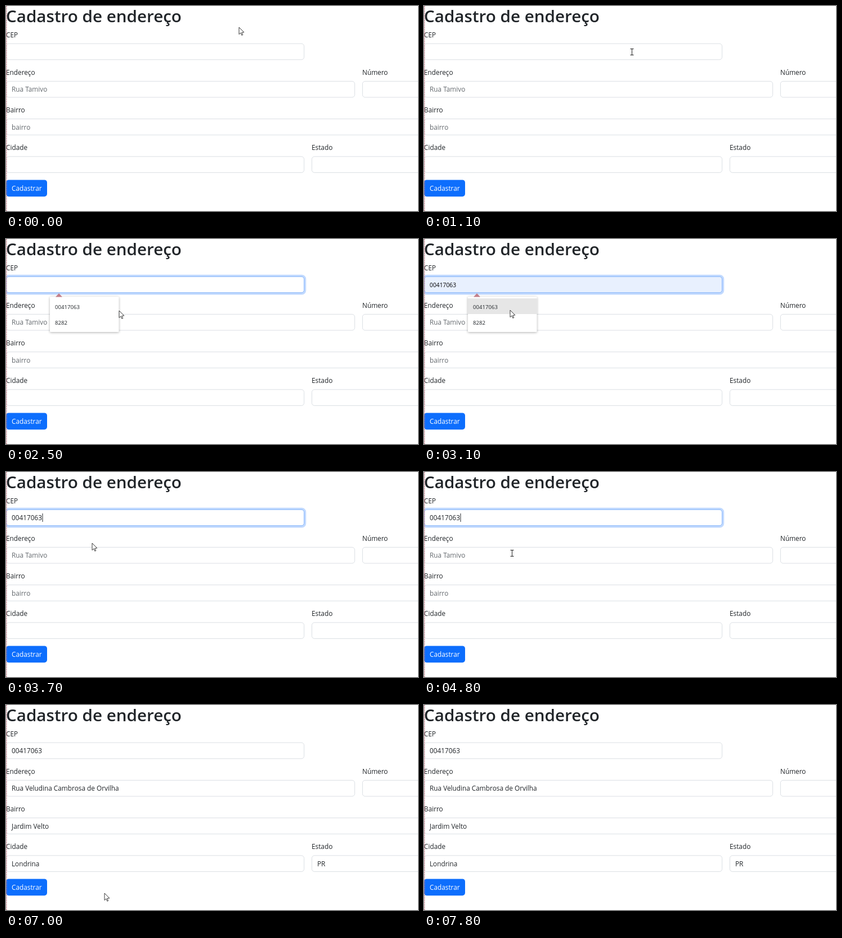
These frames come from a looping animation (732 by 366 pixels, 8 s). An HTML page with a canvas:

```html
<!DOCTYPE html>
<html lang="pt-BR">
<head>
<meta charset="utf-8">
<title>Cadastro de endereço</title>
<style>
html, body { margin: 0; width: 100%; height: 100%; overflow: hidden; background: #fff; }
canvas { display: block; }
</style>
</head>
<body>
<canvas id="stage" width="732" height="366"></canvas>
<script>
const ctx = document.getElementById('stage').getContext('2d');
const FONT = '"Open Sans", "Noto Sans", sans-serif';
const INK = '#212529', HINT = '#64696e', BLUE = '#0d6efd';
const LOOP = 8000, STEP = 100;
const CEP = '00417063';

// Moments of the story, in ms
const CLICK = 1700, HOVER = 2600, PICK = 3600, FILL = 5700;

// Form layout: rows at a fixed pitch, all controls equally high
const TOP = 67, PITCH = 67.2, HEIGHT = 29.4, RADIUS = 4.7, PAD = 10, SIZE = 11.8;
const field = (row, x, right, label, hint = '', value = '') =>
  ({ x, y: TOP + row * PITCH, w: right - x, label, hint, value });
const fields = [
  field(0, 0, 530, 'CEP'),
  field(1, 0, 620, 'Endereço', 'Rua Tamivo', 'Rua Veludina Cambrosa de Orvilha'),
  field(1, 633, 780, 'Número'),
  field(2, 0, 780, 'Bairro', 'bairro', 'Jardim Velto'),
  field(3, 0, 530, 'Cidade', '', 'Londrina'),
  field(3, 543, 780, 'Estado', '', 'PR')
];
const cepField = fields[0];

// Pointer moves; it rests between them
const move = (from, to, x, y) => ({ from, to, x, y });
const moves = [
  move(0, 1100, 369, 82),
  move(1900, 2500, 201, 128),
  move(2500, 3100, 153, 127),
  move(4300, 4800, 156, 145),
  move(4800, 5400, 175, 336),
  move(7200, 7400, 421, 143),
  move(7400, 7600, 474, -11),
  move(7700, 7800, 476, -30)
];

function pointerAt(t) {
  let x = 414, y = 38;
  for (const m of moves) {
    const u = Math.min(1, Math.max(0, (t - m.from) / (m.to - m.from)));
    const k = u * u * (3 - 2 * u);
    x += (m.x - x) * k;
    y += (m.y - y) * k;
  }
  return [x, y];
}

function text(str, x, y, size = SIZE, color = INK, weight = 400) {
  ctx.font = `${weight} ${size}px ${FONT}`;
  ctx.fillStyle = color;
  ctx.fillText(str, x, y);
}

function fillBox(x, y, w, h, r, color) {
  ctx.beginPath();
  ctx.roundRect(x, y, w, h, r);
  ctx.fillStyle = color;
  ctx.fill();
}

function polygon(points) {
  ctx.beginPath();
  points.forEach(([x, y]) => ctx.lineTo(x, y));
  ctx.closePath();
}

function drawInput({ x, y, w }, border, fill) {
  fillBox(x + 0.4, y + 0.2, w - 0.8, HEIGHT - 0.8, RADIUS, fill);
  ctx.strokeStyle = border;
  ctx.lineWidth = 1;
  ctx.stroke();
}

function drawField(f, filled) {
  text(f.label, f.x, f.y - 11.2);
  drawInput(f, '#dbdfe4', '#fff');
  const done = filled && f.value;
  text(done ? f.value : f.hint, f.x + PAD, f.y + 19.2, SIZE, done ? INK : HINT);
}

// The ring fades in and out over one step
function focusLevel(t) {
  if (t < CLICK || t >= FILL + STEP) return 0;
  return t < CLICK + STEP || t >= FILL ? 0.5 : 1;
}

function drawFocus(level, preview) {
  const { x, y, w } = cepField, s = 3.2 * level;
  ctx.globalAlpha = 0.25 * level;
  fillBox(x - s, y - s, w + 2 * s, HEIGHT + 2 * s, RADIUS + s, BLUE);
  ctx.globalAlpha = 1;
  drawInput(cepField, level < 1 ? '#a5c9f7' : '#86b7fe', preview ? '#e8f0fe' : '#fff');
}

function drawMenu(active) {
  const x = 78, y = 103, w = 122.5;
  ctx.save();
  ctx.shadowColor = 'rgba(0,0,0,.32)';
  ctx.shadowBlur = 4;
  ctx.shadowOffsetY = 1;
  fillBox(x, y, w, 63, 1.5, '#fff');
  ctx.restore();
  polygon([[x + 10, y + 0.5], [x + 16, y - 6], [x + 22, y + 0.5]]);
  ctx.fill();
  if (active) fillBox(x, y + 3, w, 28, 0, '#e6e6e6');
  [CEP, '8282'].forEach((item, i) => text(item, x + 9, y + 21.5 + 28 * i, 9.6));
}

function drawArrow(x, y) {
  const s = 0.785;
  const shape = [[0, 0], [0, 16], [3.7, 12.6], [6.2, 18.2], [8.5, 17.2], [6.1, 11.8], [11.3, 11.4]];
  polygon(shape.map(([a, b]) => [x + a * s, y + b * s]));
  ctx.fillStyle = '#fff';
  ctx.fill();
  ctx.strokeStyle = '#222';
  ctx.lineWidth = 0.9;
  ctx.stroke();
}

function drawBeam(x, y) {
  x = Math.round(x);
  y = Math.round(y);
  ctx.fillStyle = '#222';
  ctx.fillRect(x, y - 6, 1, 12);
  for (const end of [y - 6, y + 5]) ctx.fillRect(x - 2.5, end, 6, 1);
}

function drawPointer(x, y) {
  const overField = fields.some(f =>
    x > f.x && x < f.x + f.w && y > f.y && y < f.y + HEIGHT);
  (overField ? drawBeam : drawArrow)(x, y);
}

// Blinks every half second from the moment it was placed
function drawCaret(t) {
  const picked = t >= PICK;
  if (Math.floor((t - (picked ? PICK : CLICK)) / 500) % 2) return;
  ctx.fillStyle = INK;
  ctx.fillRect(picked ? 64.5 : PAD, 74, 1, 15);
}

function draw(t) {
  const focus = focusLevel(t);
  const preview = t >= HOVER && t < PICK;

  ctx.fillStyle = '#fff';
  ctx.fillRect(0, 0, 732, 366);
  text('Cadastro de endereço', 0, 28.5, 29.6, INK, 600);
  fields.forEach(f => drawField(f, t >= FILL));

  if (focus) drawFocus(focus, preview);
  if (preview) text(CEP, PAD, 85.8, 10.3, '#000');
  if (t >= PICK) text(CEP, PAD, 86.2);
  if (focus && !preview && t < FILL) drawCaret(t);

  fillBox(0, 310.4, 73, 29.8, RADIUS, BLUE);
  text('Cadastrar', PAD, 329.8, SIZE, '#fff');

  ctx.fillStyle = '#c27f8a';
  for (let y = 0; y < 366; y += 3.14) ctx.fillRect(0, y, 1.6, 1.7);

  if (t >= CLICK && t < PICK) drawMenu(preview);
  drawPointer(...pointerAt(t));
}

function tick() {
  const t = performance.now() % LOOP;
  draw(Math.floor(t / STEP) * STEP);
  requestAnimationFrame(tick);
}
tick();
</script>
</body>
</html>
```
